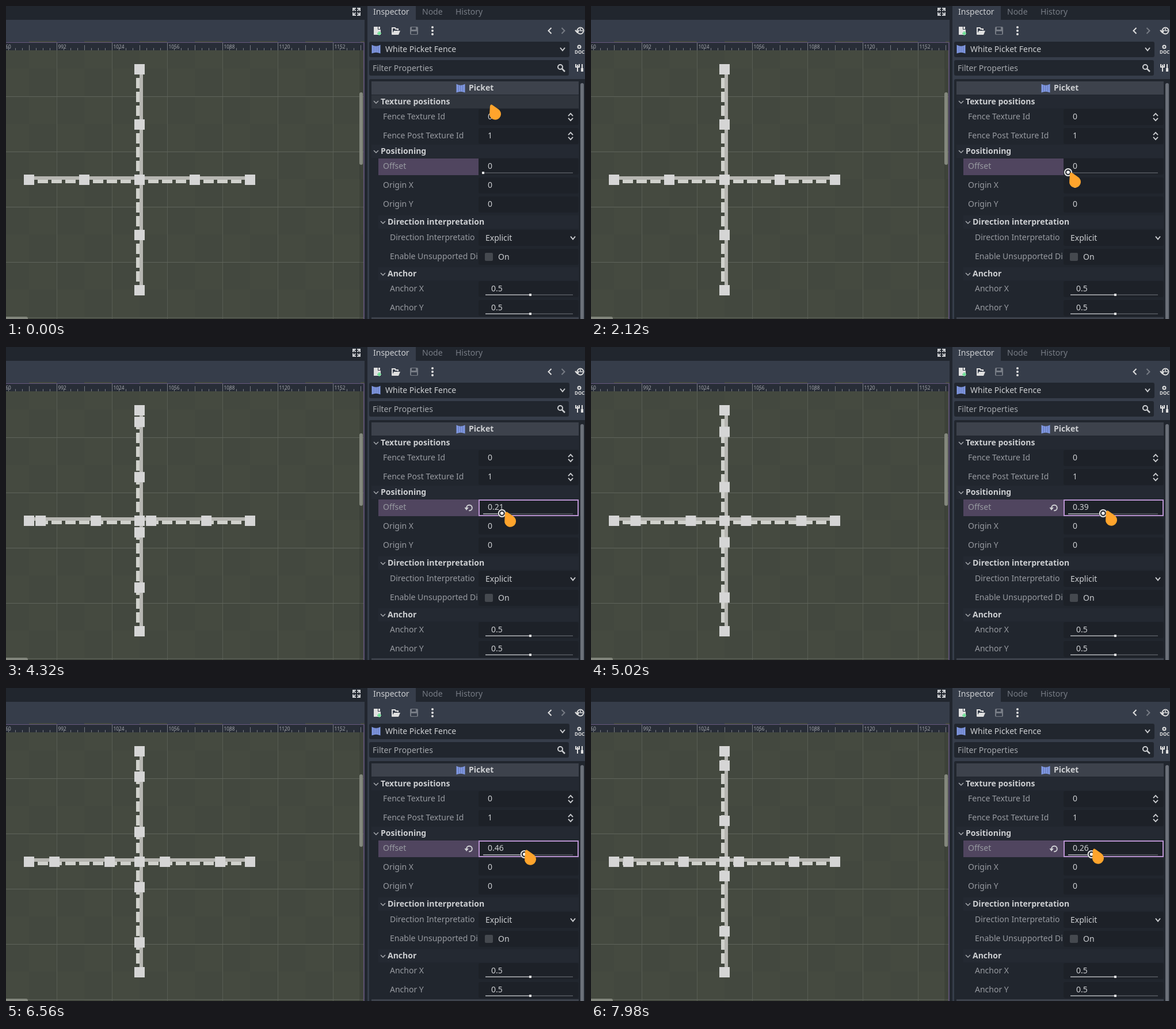
These frames come from a looping animation (1006 px wide and 544 px high, 8000 ms). An HTML page with a canvas:

```html
<!DOCTYPE html>
<html lang="en">
<head>
<meta charset="utf-8">
<style>
html, body { margin: 0; width: 100%; height: 100%; overflow: hidden; background: #21262e; }
canvas { display: block; }
</style>
</head>
<body>
<canvas id="stage" width="1006" height="544"></canvas>
<script>
const g = document.getElementById('stage').getContext('2d');
const LOOP = 8000;
const BASE = '#363d4a', DARK = '#21262e', FIELD = '#1d2128';
const TEXT = '#cdcfd2', DIM = '#989ba1', FAINT = '#777c85', BLUE = '#8098e2', WHITE = '#e0e0e0';

// time, cursor x, cursor y, offset value
const KEYS = [
  [0, 840, 171, 0], [820, 840, 288, 0], [1000, 840, 289, 0], [1140, 836, 289, 0],
  [1280, 836, 289, 0], [1380, 833, 289, 0], [1680, 833, 289, 0], [1700, 831, 289, 0],
  [2220, 831, 289, 0], [2680, 834, 289, .02], [3480, 846, 288, .09], [3520, 847, 288, .095],
  [4360, 867, 286, .22], [5020, 894, 284, .39], [5200, 898, 283, .416],
  [5760, 917, 282, .57], [6040, 917, 282, .57], [6560, 901, 281, .46],
  [6840, 893, 281, .405], [7280, 875, 280, .29], [7720, 875, 280, .29], [7980, 871, 279, .26], [8000, 871, 279, .26]
];

function pose(t) {
  const i = Math.max(1, KEYS.findIndex(k => k[0] > t));
  const a = KEYS[i - 1], b = KEYS[i];
  let p = (t - a[0]) / (b[0] - a[0]);
  if (i === 1) p = p * p * (3 - 2 * p);
  const [, x, y, v] = a.map((n, j) => n + (b[j] - n) * p);
  return { x, y, v: Math.round(v * 100) / 100 };
}

function rect(x, y, w, h, color) {
  g.fillStyle = color;
  g.fillRect(x, y, w, h);
}

function round(x, y, w, h, color, r = 3) {
  g.fillStyle = color;
  g.beginPath();
  g.roundRect(x, y, w, h, r);
  g.fill();
}

function line(points, color = TEXT, width = 2) {
  g.strokeStyle = color;
  g.lineWidth = width;
  g.beginPath();
  for (let i = 0; i < points.length; i += 2) g.lineTo(points[i], points[i + 1]);
  g.stroke();
}

function circle(x, y, r, color, width) {
  g.beginPath();
  g.arc(x, y, r, 0, 7);
  g.fillStyle = g.strokeStyle = color;
  g.lineWidth = width;
  if (width) g.stroke(); else g.fill();
}

function shape(x, y, path, color) {
  g.save();
  g.translate(x, y);
  g.fillStyle = color;
  g.fill(path);
  g.restore();
}

// y is the vertical middle of the capitals
function text(s, x, y, color = TEXT, font = '14px') {
  g.font = font + ' "Noto Sans", sans-serif';
  g.fillStyle = color;
  g.fillText(s, x, y + 5);
}

const chevron = (x, y, dx, dy, color = TEXT, w = 2) =>
  line(dy ? [x - 4, y - dy, x, y + dy, x + 4, y - dy] : [x - dx, y - 5, x + dx, y, x - dx, y + 5], color, w);

const DROP = new Path2D('M1 3Q2 -1 5 1L15 8A10 10 0 1 1 .2 15Z');
const PANEL = new Path2D('M-7.5 -7.5Q0 -3 7.5 -7.5V7.5Q0 4 -7.5 7.5Z');
const SHEET = new Path2D('M0 0H7V5H12V14H0Z');
const FOLDER = new Path2D('M4 0H15L12 7H0Z');
const ARROW = new Path2D('M0 0H7.5L3.5 5Z');

function picket(x, y) {
  shape(x, y, PANEL, BLUE);
  for (let i = -1; i < 2; i++) rect(x - .4 + i * 3.7, y - 5, .8, 10, 'rgba(40,48,80,.45)');
}

function viewport(v) {
  rect(0, 0, 623, 24, DARK);
  rect(0, 24, 623, 39, BASE);
  for (const [dx, dy] of [[-1, -1], [1, -1], [-1, 1], [1, 1]]) {
    const x = 609 + dx * 6, y = 10 + dy * 6;
    line([x - dx * 5, y, x, y, x, y - dy * 5], TEXT, 2);
    line([x, y, x - dx * 4.5, y - dy * 4.5], TEXT, 2);
  }

  rect(0, 77, 622, 467, '#43483f');
  for (let i = 0; i < 14; i++)
    for (let j = 0; j < 11; j++)
      if ((i + j) % 2) rect(i * 48 - 8, j * 48 + 61, 48, 48, '#454a40');
  for (let x = 88; x < 622; x += 96) rect(x, 77, 1, 467, '#575c53');
  for (let y = 157; y < 544; y += 96) rect(0, y, 622, 1, '#5f645b');

  rect(0, 63, 622, 14, '#282d37');
  for (let i = 0; i < 7; i++) {
    const x = i * 96 - 8;
    rect(x, 64, 1, 13, '#777b82');
    for (let k = 1; k < 8; k++) rect(x + k * 12, k === 4 ? 68 : 73, 1, k === 4 ? 9 : 4, '#777b82');
    text(960 + i * 32, x + 2.5, 68.5, '#a4a7ad', '8.3px');
  }
  rect(614, 77, 6, 467, 'rgba(40,44,38,.25)');
  round(614, 150, 6, 126, '#83877d');
  round(-6, 540, 44, 6, '#83877d');
  rect(0, 63, 623, 1, '#67587f');
  rect(621, 63, 2, 481, '#5a4f70');
  fence(v);
}

function fence(v) {
  const BAR = '#b6b6b1', SLAT = '#d0d1cc', POST = '#d5d5d5';
  const X = 31, Y = 101;
  rect(X, 296, 402, 6, BAR);
  rect(232, Y, 6, 402, BAR);
  for (let k = 0; k < 17; k++) {
    rect(X + k * 24, 302, 18, 6, SLAT);
    rect(226, Y + k * 24, 6, 18, SLAT);
  }
  const post = d => {
    rect(X + d, 293, 18, 18, POST);
    rect(223, Y + d, 18, 18, POST);
  };
  [0, 192, 384].forEach(post);
  for (let k = 0; k < 4; k++) post((k + v) * 96);
}

function toolbar() {
  rect(623, 0, 383, 544, DARK);
  rect(628, 24, 378, 520, BASE);
  rect(628, 0, 84, 24, BASE);
  text('Inspector', 638, 10);
  text('Node', 723, 10, FAINT);
  text('History', 781, 10, FAINT);

  shape(639, 36, SHEET, WHITE);
  rect(647, 36, 3, 4, WHITE);
  rect(645, 46.5, 7, 2, '#5fe08c');
  rect(647.5, 44, 2, 7, '#5fe08c');

  line([671, 49, 671, 38, 676, 38, 677, 40, 681, 40, 681, 42], WHITE);
  shape(670, 43, FOLDER, WHITE);

  round(702, 36, 14, 14, FAINT, 2);
  rect(705, 37, 7, 4, BASE);
  rect(704, 44, 10, 5, BASE);
  for (const y of [37, 43, 49]) circle(741, y, 2, WHITE);
  chevron(945, 43, -2.5, 0, WHITE);
  chevron(968, 43, 2.5, 0, FAINT);
  circle(998, 43, 5.5, WHITE, 2);
  line([998, 39, 998, 43, 1002, 43], WHITE, 1.5);
  line([989, 42, 992.5, 46, 996, 42], WHITE);

  round(631, 62, 348, 27, DARK);
  picket(643, 75);
  text('White Picket Fence', 659, 75);
  chevron(967, 75, 0, 2.5);
  round(631, 94, 347, 27, DARK);
  text('Filter Properties', 637, 108, '#a5a8ad');
  circle(963, 106, 4, TEXT, 2);
  line([966, 109, 971, 114], TEXT, 2.5);

  circle(996, 71, 2.5, WHITE, 2);
  text('DOC', 988, 78, WHITE, 'bold 8px');
  line([993, 102, 993, 114], WHITE);
  line([990, 101, 990, 106, 996, 106, 996, 101], WHITE);
  line([1001, 101, 1001, 108], WHITE);
  line([1001, 108, 1001, 114], WHITE, 4);
}

function section(name, x, y, hover) {
  rect(x - 16, y - 11, 995 - x + 16, 23, hover ? '#30353d' : '#242932');
  chevron(x - 8, y + 1, 0, 2, '#a5a8ad', 1.5);
  text(name, x, y, TEXT, 'bold 14px');
}

function row(name, x, y, value, vx = 837) {
  round(821, y - 13, 174, 28, FIELD);
  g.save();
  g.beginPath();
  g.rect(x - 2, y - 14, 821 - x, 30);
  g.clip();
  text(name, x, y, DIM);
  g.restore();
  if (value !== undefined) text(value, vx, y);
}

function slider(x, y, p) {
  const end = x + (985 - x) * p;
  rect(x, y, 985 - x, 2, '#484c53');
  rect(x, y, end - x, 2, '#8f9297');
  rect(end - 2, y - 1, 4, 4, '#e4e5e6');
}

function inspector({ y, v }, t) {
  round(631, 127, 380, 420, DARK);
  rect(635, 131, 360, 23, '#3d424c');
  picket(790, 143);
  text('Picket', 804, 142, TEXT, 'bold 14px');

  section('Texture positions', 651, 166, y < 178);
  row('Fence Texture Id', 655, 192, '0');
  row('Fence Post Texture Id', 655, 225, '1');
  for (const cy of [192, 225]) {
    chevron(981, cy - 3, 0, -2.2, TEXT, 1.8);
    chevron(981, cy + 5, 0, 2.2, TEXT, 1.8);
  }

  section('Positioning', 651, 252);
  rect(647, 265, 174, 29, '#50455f');
  row('Offset', 655, 278, String(v));
  row('Origin X', 655, 311, '0');
  row('Origin Y', 655, 344, '0');
  if (v > 0) {
    g.strokeStyle = '#b892d0';
    g.lineWidth = 2;
    g.strokeRect(822, 266, 172, 27);
    g.strokeStyle = TEXT;
    g.beginPath();
    g.arc(805, 279.5, 4.8, Math.PI * .95, Math.PI * 2.55);
    g.stroke();
    shape(796.5, 279, ARROW, TEXT);
  }
  slider(829, 289, v);
  if (y > 264) {
    const x = 829 + 156 * v, pressed = t >= 1680;
    circle(x, 289, 7.5, '#282c33');
    circle(x, 289, 6, pressed ? '#e8e8e8' : '#a9abae', pressed ? 2 : 1.6);
    circle(x, 289, 2.8, '#fff');
  }

  section('Direction interpretation', 663, 375);
  row('Direction Interpretatio', 667, 402);
  text('Explicit', 833, 403);
  chevron(985, 403, 0, 2.5);
  row('Enable Unsupported Di', 667, 435);
  round(832, 429, 14, 14, '#45494f', 2);
  text('On', 855, 436);

  section('Anchor', 663, 465);
  row('Anchor X', 667, 491, '0.5', 843);
  row('Anchor Y', 667, 524, '0.5', 843);
  slider(833, 501, .513);
  slider(833, 534, .513);
  rect(635, 541, 360, 3, '#3d424c');
  round(998, 134, 6, 420, '#6b7079');
}

function draw(t) {
  const p = pose(t);
  viewport(p.v);
  toolbar();
  inspector(p, t);
  shape(p.x, p.y, DROP, '#ffa42c');
}

const start = performance.now();
function tick(now) {
  draw(Math.max(0, now - start) % LOOP);
  requestAnimationFrame(tick);
}
draw(0);
requestAnimationFrame(tick);
</script>
</body>
</html>
```
